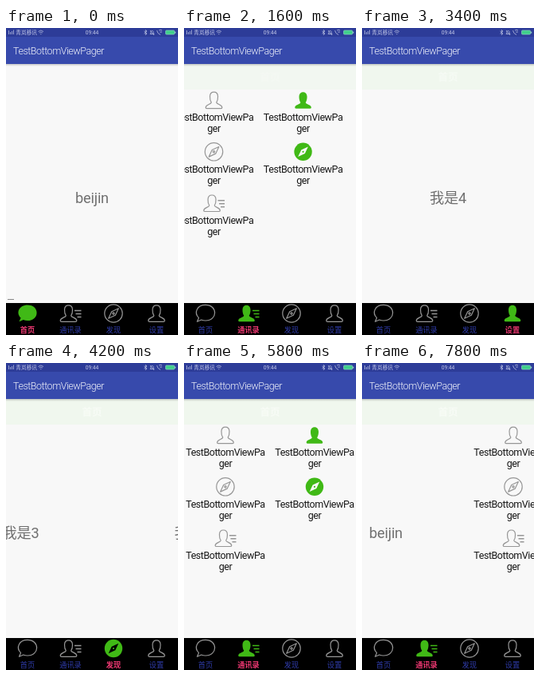
An HTML page for the animation above (8000 ms loop, 216 by 384 pixels).

```html
<!DOCTYPE html>
<html lang="zh">
<head>
<meta charset="utf-8">
<title>TestBottomViewPager</title>
<style>
html, body { margin: 0; width: 100%; height: 100%; overflow: hidden; background: #f8f8f8; }
svg { display: block; }
#stage { width: 100vw; height: 100vh; font-family: Roboto, "Noto Sans CJK SC", "Noto Sans CJK", sans-serif; }
.mid { text-anchor: middle; }
.big { font-size: 18.2px; letter-spacing: -.2px; fill: #707070; }
.item, .title { font-size: 12.5px; letter-spacing: -.46px; }
.item { fill: #181818; }
.title { font-weight: 300; fill: #f2f4fb; }
.icon { fill: none; stroke: currentColor; stroke-width: 1.2; stroke-linejoin: round; color: #969696; --needle: none; }
.icon.on { fill: currentColor; stroke: none; color: #40b916; --needle: #f8f8f8; }
.tab .icon.on { --needle: #000; }
.tab text { font-size: 9.2px; font-weight: 500; fill: #2f3cab; }
.tab .on + text { fill: #ee3872; font-weight: 700; }
.status { font-size: 6.7px; fill: #c3c8e8; }
.glyph { fill: none; stroke: #b4bbdf; stroke-width: .8; }
</style>
</head>
<body>
<svg id="stage" viewBox="0 0 216 384" preserveAspectRatio="none">
  <defs>
    <linearGradient id="shade" x2="0" y2="1">
      <stop stop-color="#000" stop-opacity=".2"/><stop offset="1" stop-color="#000" stop-opacity="0"/>
    </linearGradient>
    <g id="bubble"><path d="M-10.5 10.2L-8.4 5.6C-15-1-10.5-10.6 0-10.6C15.5-10.6 15.5 9 0 9Q-3 9-5.2 8Z"/></g>
    <g id="person"><path d="M-10.3 9C-10.3 5.4-3.6 5.2-3.2 2.8C-4.6 .8-5.1-2-5-4.8C-4.7-12 4.7-12 5-4.8C5.1-2 4.6 .8 3.2 2.8C3.6 5.2 10.3 5.4 10.3 9Q10.3 10.3 8.5 10.3H-8.5Q-10.3 10.3-10.3 9Z"/></g>
    <g id="contacts"><use href="#person" x="-2.5"/><path d="M5-3.5H13.5M6.5 .5H13.5M8.5 4.5H13.5" stroke="currentColor" stroke-width="1.6"/></g>
    <g id="compass"><circle r="11.2"/><path d="M6.3-6.3L2.3 2.3L-6.3 6.3L-2.3-2.3Z" style="fill:var(--needle)"/><circle r="1.1"/></g>
  </defs>

  <rect width="216" height="384" fill="#f8f8f8"/>
  <g id="pager">
    <text class="mid big" x="108" y="219">beijin</text>
    <path d="M2 339.5H10" stroke="#888"/>
    <g id="grid" transform="translate(216)"></g>
    <text class="mid big" x="540" y="219">我是3</text>
    <text class="mid big" x="756" y="219">我是4</text>
  </g>
  <g id="banner">
    <rect y="45" width="216" height="32" fill="#f0f7ee"/>
    <text id="bannerText" class="mid" x="108" y="66" font-size="12.5" font-weight="700" fill="#fafdf9">首页</text>
  </g>

  <rect y="45" width="216" height="3" fill="url(#shade)"/>
  <rect width="216" height="45" fill="#374aac"/>
  <rect width="216" height="11" fill="#2d3c98"/>
  <text class="title" x="9" y="33">TestBottomViewPager</text>
  <g class="status">
    <text x="12.3" y="8.3">青岚移讯</text>
    <text class="mid" x="108" y="8.3">09:44</text>
  </g>
  <g class="glyph">
    <path d="M3.5 3V8M5.5 5V8M7.5 4V8M9.5 2.5V8"/>
    <path d="M40.5 4.5Q43.8 1.5 47 4.5M41.8 6Q43.8 4.2 45.8 6M43.2 7.6H44.4"/>
    <path d="M173.5 4L177 7L175.3 8.5V2.5L177 4L173.5 7"/>
    <path d="M181 7.5H186L185 6V4.5Q183.5 1.5 182 4.5V6ZM181 3L186 9"/>
    <path d="M189.5 3Q190 7 194 8.5M192 3Q194 1.5 196 3M193 5H196"/>
  </g>
  <rect x="200.5" y="3" width="11" height="5" rx="1" fill="#3fd08a" stroke="#8fcfc4" stroke-width=".7"/>
  <rect x="212" y="4.6" width="1.2" height="2" fill="#8fcfc4"/>

  <rect y="344" width="216" height="40" fill="#000"/>
  <g id="tabs"></g>
</svg>
<script>
const LOOP = 8000, TICK = 200, PAGE = 216;
const $ = id => document.getElementById(id);
const icon = (name, x, y, on = false) =>
  `<use class="icon${on ? ' on' : ''}" href="#${name}" transform="translate(${x} ${y})"/>`;

const items = [['person'], ['person', true], ['compass'], ['compass', true], ['contacts']];
$('grid').innerHTML = items.map(([name, on], i) => {
  const x = 52 + 112 * (i % 2), y = 90.4 + 64.4 * Math.floor(i / 2);
  return icon(name, x, y, on) + `<text class="mid item" x="${x}" y="${y + 25.8}">TestBottomViewPa` +
    `<tspan x="${x}" dy="14">ger</tspan></text>`;
}).join('');

const tabs = [['bubble', '首页'], ['contacts', '通讯录'], ['compass', '发现'], ['person', '设置']];
$('tabs').innerHTML = tabs.map(([name, label], i) => {
  const x = 27 + 54 * i;
  return `<g class="tab">${icon(name, x, 357)}<text class="mid" x="${x}" y="381.3">${label}</text></g>`;
}).join('');
const tabIcons = document.querySelectorAll('.tab .icon');

// Each swipe is a finger drag that speeds up, then a settling glide.
const easeIn = u => u ** 1.4, easeOut = u => 1 - (1 - u) ** 3, smooth = u => u * u * (3 - 2 * u);
const scroll = [
  [0, 0], [200, 0], [800, .94, smooth], [1100, 1, easeOut],
  [1480, 1], [2240, 2, smooth], [2640, 2], [3360, 3, smooth],
  [3880, 3], [4200, 2.414, easeIn], [4640, 2, easeOut],
  [5100, 2], [5400, 1.21, easeIn], [5840, 1, easeOut],
  [6160, 1], [6400, .648, easeIn], [6900, 0, easeOut],
  [7450, 0], [7800, .361, easeIn], [8000, .77]
];
const selections = [[0, 0], [600, 1], [1800, 2], [3000, 3], [4120, 2], [5320, 1], [6320, 0], [7700, 1]];

function positionAt(t) {
  const i = scroll.findIndex(key => key[0] > t);
  const [t0, p0] = scroll[i - 1], [t1, p1, ease = u => u] = scroll[i];
  return p0 + (p1 - p0) * ease((t - t0) / (t1 - t0));
}
const ramp = (t, from, to) => Math.min(1, Math.max(0, (t - from) / (to - from)));

function draw(now) {
  const t = Math.floor((now % LOOP) / TICK) * TICK;
  $('pager').setAttribute('transform', `translate(${-PAGE * positionAt(t)})`);
  const selected = selections.filter(s => s[0] <= t).pop()[1];
  tabIcons.forEach((el, i) => el.classList.toggle('on', i === selected));
  $('banner').setAttribute('opacity', ramp(t, 1200, 1800));
  $('bannerText').setAttribute('opacity', .3 + .4 * ramp(t, 2400, 3800));
}
const start = performance.now();
function frame() {
  draw(performance.now() - start);
  requestAnimationFrame(frame);
}
frame();
</script>
</body>
</html>
```
